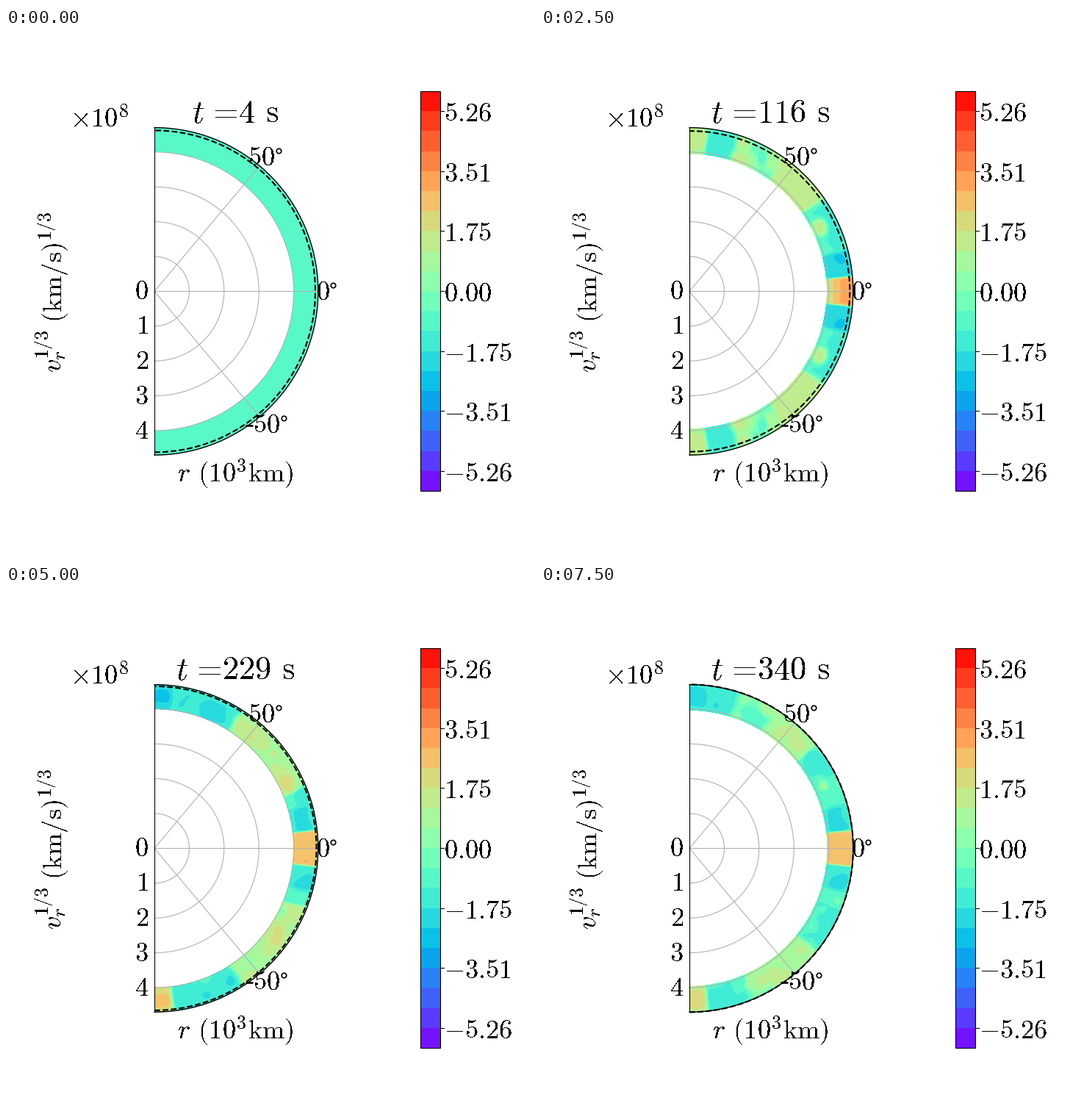
Recreate the animation shown at these times as a matplotlib script. Size 720 px wide and 720 px high, loop 8000 ms.

```python
import numpy as np
import matplotlib.pyplot as plt
from matplotlib.animation import FuncAnimation
from matplotlib.patches import Rectangle

plt.rcParams["mathtext.fontset"] = "cm"
plt.rcParams["text.antialiased"] = False

SIZE, DPI = 720, 72            # one point equals one pixel
CX, CY, R_OUT, UNIT = 202, 358.4, 222.8, 47.4
FRAMES, INTERVAL = 16, 500
EM = 36.5                      # label size
LEVELS = np.linspace(-5.847, 5.847, 21)
CMAP = plt.get_cmap("rainbow")

lat = np.linspace(-90, 90, 541)
LAT, DEPTH = np.meshgrid(lat, np.linspace(0, 1, 31))

# Small eddies, each with its own place, size and rhythm
rng = np.random.default_rng(7)
EDDIES = [(rng.uniform(8, 90), rng.uniform(0.1, 0.9), rng.uniform(2, 4.5),
           rng.uniform(60, 140), rng.uniform(0, 2 * np.pi)) for _ in range(26)]


def wave(t, peak, period):
    return np.cos(2 * np.pi * (t - peak) / period)


def pulse(t, peak, width):
    return np.exp(-((t - peak) / width) ** 2)


def smooth(t, start, end):
    u = np.clip((t - start) / (end - start), 0, 1)
    return u * u * (3 - 2 * u)


def velocity(t):
    """Signed cube root of the radial flow over latitude and depth."""
    burst = pulse(t, 94, 20)
    split = 5 * pulse(t, 159, 25)          # the equatorial plume parts briefly
    apart = smooth(t, 160, 229)            # hemispheres lose their symmetry
    total, norm = 0, 1e-9
    for side in (1, -1):
        lag = 65 * apart * (side > 0)
        bands = [                          # latitude, velocity, width
            (split, 2.8 + 2.8 * burst * (2 * DEPTH - 1), 4 - 1.5 * burst),
            (12 - 6 * burst, -1.9 - 1.4 * burst, 4),
            (19, -1.1, 3 + 2 * burst),
            (28, -0.1 + 1.5 * wave(t, 49, 180), 8),
            (40 + 10 * smooth(t, 94, 159), 1.2 + 1.4 * burst, 8),
            (65, -0.3 + 1.5 * wave(t, 160, 150), 8),
            (78, -1.4, 5),
            (90, 2.4 * wave(t + lag, 94, 130), 6),
        ]
        for a, v, w in bands:
            k = np.exp(-3 * ((LAT - side * a) / w) ** 2) * (10 / w) ** 2
            total = total + k * v * abs(v)
            norm = norm + k
    flow = total / norm * (0.65 + 0.4 * np.sin(np.pi * DEPTH))
    for side in (1, -1):
        lag = 30 * apart * (side > 0)
        for a, rho, w, period, phase in EDDIES:
            d2 = ((LAT - side * a) / w) ** 2 + ((DEPTH - rho) / (0.1 * w)) ** 2
            swing = np.cos(2 * np.pi * (t + lag) / period + phase)
            flow = flow + 1.5 * swing * np.exp(-d2)
    v = np.sign(flow) * np.sqrt(abs(flow))
    return -0.88 + (v + 0.88) * smooth(t, 4, 49)


fig = plt.figure(figsize=(SIZE / DPI, SIZE / DPI), dpi=DPI, facecolor="white")
ax = fig.add_axes([0, 0, 1, 1])


def polar(r, deg):
    a = np.radians(deg)
    return CX + r * np.cos(a), CY - r * np.sin(a)


def label(x, y, s, size=EM, **kw):
    kw = {"ha": "left", "va": "baseline", "zorder": 6, **kw}
    return ax.text(x, y, f"${s}$", fontsize=size, **kw)


def upright(y, s, x=76, size=EM):
    label(x, y, s, size, rotation=90, rotation_mode="anchor")


def degrees(x, y, s):
    label(x, y, s)
    ax.plot(x + EM / 2 * len(s) + 5, y - 20.5, "o", ms=6.5, mew=1.7,
            mfc="none", mec="black", zorder=6)


# Polar grid and frame
for k in range(1, 5):
    ax.plot(*polar(k * UNIT, lat), color="#b0b0b0", lw=1.1, zorder=2)
for a in (-50, 0, 50):
    x, y = polar(R_OUT, a)
    ax.plot([CX, x], [CY, y], color="#b0b0b0", lw=1.1, zorder=2)
ax.plot(*polar(R_OUT, lat), color="black", lw=1.4, zorder=4)
ax.plot([CX, CX], [CY - R_OUT, CY + R_OUT], color="black", lw=1.1, zorder=4)

for k in range(5):
    label(194, 369 + k * 47.5, str(k), ha="right")
degrees(329, 187, "50")
degrees(422, 370, "0")
degrees(336, 551, "50")
ax.plot([326, 336], [541, 541], color="black", lw=2.6, zorder=6,
        solid_capstyle="butt")

label(87, 136, r"\times 10^8")
label(312.5, 619, r"r\hspace{0.38}(10^3\mathrm{km})", ha="center")
upright(469, "v_r")
upright(450, "1/3", 58, 0.7 * EM)
upright(401, r"\mathrm{(km/s)}")
upright(289, "1/3", 62, 0.7 * EM)

# Colour bar
X0, X1, TOP, CELL = 564, 591, 86, 27.2
BOTTOM = TOP + 20 * CELL
ax.imshow(np.arange(20)[::-1, None], cmap=CMAP, vmin=-0.5, vmax=19.5,
          extent=(X0, X1, BOTTOM, TOP), aspect="auto", interpolation="nearest")
ax.add_patch(Rectangle((X0, TOP), X1 - X0, BOTTOM - TOP, fill=False, lw=1.1))
for i in range(-9, 10, 3):
    y = TOP + (10 - i) * CELL
    ax.plot([X1, X1 + 4.5], [y, y], color="black", lw=1.1)
    label(596.5, y + 14, f"{LEVELS[10 + i] if i else 0:.2f}")

title = label(312.5, 129, "t", 44.5, ha="center")
dashed, = ax.plot([], [], "--", color="black", lw=2.1, zorder=5)
ax.axis("off")
shown = []


def draw(n):
    while shown:
        shown.pop().remove()
    t = np.interp(n, (0, 4, 7, 10, 13, 15), (4, 94, 159, 229, 297, 340))
    inner = 188.5 + 1.5 * wave(t, 260, 250)
    xs, ys = polar(inner + (R_OUT - inner) * DEPTH, LAT)
    shown.append(ax.contourf(xs, ys, np.clip(velocity(t), -5.8, 5.8),
                             levels=LEVELS, cmap=CMAP, zorder=1))
    ax.set(xlim=(0, SIZE), ylim=(SIZE, 0))
    dash = np.interp(t, (4, 159, 297), (219, 218, 223))
    dashed.set_data(*polar(dash, lat))
    title.set_text(r"$t\hspace{0.117}=\hspace{-0.2}%d\hspace{0.38}\mathrm{s}$"
                   % round(t))
    return []


anim = FuncAnimation(fig, draw, frames=FRAMES, interval=INTERVAL,
                     init_func=lambda: [], repeat=True, repeat_delay=0)
plt.show()
```
